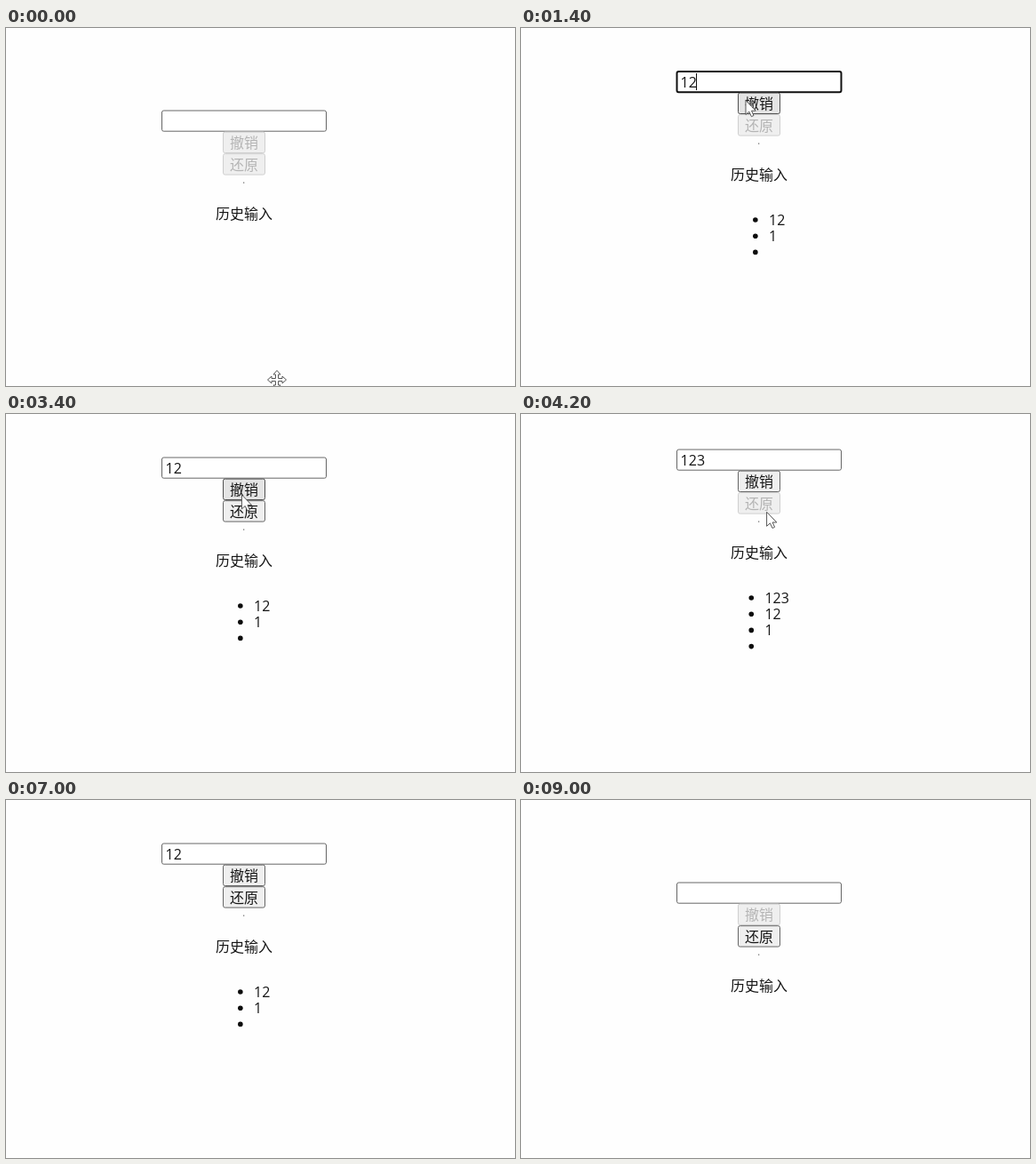
Recreate the animation shown at these times as an HTML page. Size 573 px wide and 403 px high, loop 10000 ms.

```html
<!DOCTYPE html>
<html lang="zh">
<head>
<meta charset="utf-8">
<style>
  html, body { margin: 0; width: 100%; height: 100%; overflow: hidden; background: #fefefe; }
  svg { display: block; }
  text { font: 300 16px "Noto Sans CJK SC", "Noto Sans CJK", sans-serif; fill: #161616; }
  .digits { font: 400 16px "Open Sans", "Noto Sans", sans-serif; }
  .middle { text-anchor: middle; }
  .pointer { fill: #fff; stroke: #555; stroke-linejoin: round; }
</style>
</head>
<body>
<svg width="573" height="403" viewBox="0 0 573 403">
  <g id="page">
    <rect id="field" x="175.5" width="185" height="23.2" rx="2" fill="#fff"/>
    <text id="value" class="digits" x="179.6" y="17.6"></text>
    <rect id="caret" y="2" width="1" height="19" fill="#111"/>
    <g id="undo" transform="translate(244 23.6)">
      <rect x=".5" y=".5" width="47" height="23.4" rx="2"/>
      <text class="middle" x="24" y="18.4">撤销</text>
    </g>
    <g id="redo" transform="translate(244 48.2)">
      <rect x=".5" y=".5" width="47" height="23.4" rx="2"/>
      <text class="middle" x="24" y="18.4">还原</text>
    </g>
    <rect x="267" y="80.5" width="1.3" height="1.3" fill="#777"/>
    <text class="middle" x="268" y="122">历史输入</text>
    <g id="rows"></g>
  </g>
  <g id="pointer" class="pointer">
    <path id="arrow" d="M0 0V16L3.8 12.6L6.4 18.2L9 17L6.5 11.7H11.3Z"/>
    <path id="beam" d="M-3-8.5H3M0-8.5V8.5M-3 8.5H3"/>
    <g id="move"></g>
  </g>
</svg>
<script>
const LOOP = 10000, STEP = 100, DIGIT = 9.15, TYPED = "123";

// When each action happens; every part of the page state follows from these.
const typing = [1000, 1400, 1800];
const undos = [2700, 5100, 7000, 7700, 8300];
const redos = [4100, 5900];
const focus = { from: 500, blink: 2400, to: 2700 };

// The pointer rests at a spot until the next glide begins.
const spots = {
  start: [305, 396], field: [268, 104], edge: [253, 81.5], undo: [261, 74.5],
  redo: [270, 108], below: [276.6, 110.3], away: [284, 400]
};
const glides = [
  { from: 0, to: 500, spot: "field" },
  { from: 500, to: 700, spot: "edge" },
  { from: 1400, to: 2000, spot: "undo" },
  { from: 3200, to: 3900, spot: "redo" },
  { from: 4000, to: 4200, spot: "below" },
  { from: 4400, to: 4800, spot: "undo" },
  { from: 5200, to: 5700, spot: "redo" },
  { from: 6600, to: 6800, spot: "undo" },
  { from: 7300, to: 8000, spot: "field" },
  { from: 8700, to: 9000, spot: "away" }
];

const el = id => document.getElementById(id);
const set = (node, attrs) => {
  for (const key in attrs) node.setAttribute(key, attrs[key]);
};
const svg = (tag, attrs, parent) => {
  const node = document.createElementNS("http://www.w3.org/2000/svg", tag);
  set(node, attrs);
  return parent.appendChild(node);
};
const show = (node, on) => set(node, { visibility: on ? "visible" : "hidden" });
const easeOut = k => 1 - (1 - k) ** 2;

for (let angle = 0; angle < 360; angle += 90) {
  svg("path", { d: "M-1.5-1.5V-6H-4L0-10.5L4-6H1.5V-1.5", transform: `rotate(${angle})` }, el("move"));
}

const rows = Array.from({ length: TYPED.length + 1 }, () => {
  const g = svg("g", {}, el("rows"));
  svg("circle", { cx: -15.2, r: 2.8, fill: "#0c0c0c" }, g);
  const label = svg("text", { class: "digits", y: 5.8 }, g);
  return { g, label };
});

function pointerAt(t) {
  let pos = spots.start;
  for (const { from, to, spot } of glides) {
    if (t < from) break;
    const k = easeOut(Math.min(1, (t - from) / (to - from)));
    pos = pos.map((v, i) => v + (spots[spot][i] - v) * k);
  }
  return pos;
}

function paintButton(button, enabled, hovered) {
  const hot = enabled && hovered;
  set(button.children[0], {
    fill: hot ? "#e4e4e4" : "#efefef",
    stroke: !enabled ? "#cfcfcf" : hot ? "#505050" : "#666"
  });
  button.children[1].style.fill = enabled ? "#161616" : "#b4b4b4";
}

function render(time) {
  const t = Math.floor(time / STEP) * STEP;
  const done = times => times.filter(at => at <= t).length;
  const undone = done(undos) - done(redos);
  const count = done(typing) - undone;
  const top = count ? 67 - 9 * count : 93;
  const focused = t >= focus.from && t < focus.to;
  const [x, y] = pointerAt(t);
  const pointerOn = t < 7000 || (t >= 7300 && t < 9000);
  const over = offset => pointerOn && x > 244 && x < 292 && y >= top + offset && y < top + offset + 24;

  set(el("page"), { transform: `translate(0 ${top})` });
  set(el("field"), { stroke: focused ? "#101010" : "#666", "stroke-width": focused ? 2 : 1 });
  el("value").textContent = TYPED.slice(0, count);
  set(el("caret"), { x: Math.floor(179.6 + DIGIT * count) });
  show(el("caret"), focused && t < focus.blink);
  paintButton(el("undo"), count > 0, over(24));
  paintButton(el("redo"), undone > 0, over(48.5));

  const left = 288.2 - DIGIT * count / 2;
  rows.forEach(({ g, label }, i) => {
    show(g, count > 0 && i <= count);
    set(g, { transform: `translate(${left} ${167 + 18.2 * i})` });
    label.textContent = TYPED.slice(0, Math.max(0, count - i));
  });

  const shape = t < STEP ? "move" : t >= focus.from && t < typing[0] ? "beam" : "arrow";
  set(el("pointer"), { transform: `translate(${x} ${y})` });
  for (const id of ["arrow", "beam", "move"]) show(el(id), pointerOn && id === shape);
}

const start = performance.now();
function tick() {
  render((performance.now() - start) % LOOP);
  requestAnimationFrame(tick);
}
tick();
</script>
</body>
</html>
```
